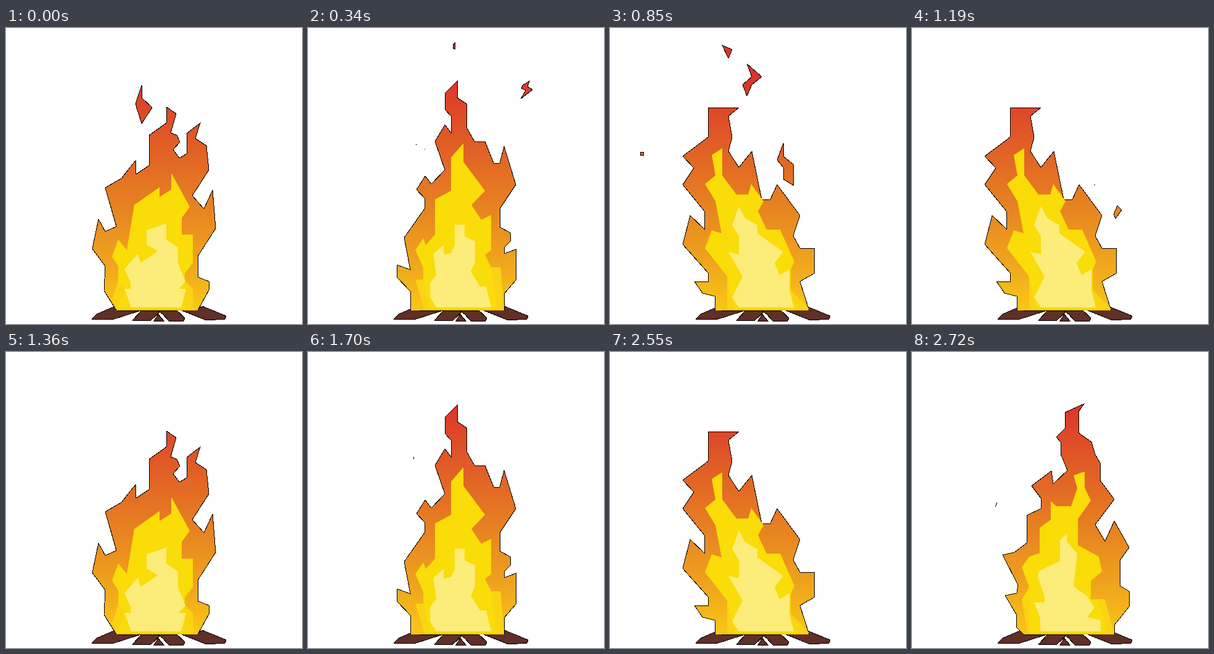
An HTML page that plays this animation: 480 by 480 pixels, repeating every 2.89 s.

```html
<!DOCTYPE html>
<html lang="en">
<head>
<meta charset="utf-8">
<title>Campfire</title>
<style>
  html, body { margin: 0; width: 100%; height: 100%; overflow: hidden; background: #fff; }
  svg { display: block; width: 100vw; height: 100vh; }
  .line { stroke: #000; vector-effect: non-scaling-stroke; shape-rendering: crispEdges; }
  .heat { fill: url(#heat); }
  .wood { fill: #5f2f28; }
  .middle { fill: #f9dc08; }
  .skirt { fill: #fad313; }
  .core { fill: #fcec79; }
</style>
</head>
<body>
<svg viewBox="0 0 480 480">
  <defs>
    <linearGradient id="heat" gradientUnits="userSpaceOnUse" x1="0" y1="85" x2="0" y2="458">
      <stop offset="0" stop-color="#dc352a"/>
      <stop offset=".23" stop-color="#df5727"/>
      <stop offset=".55" stop-color="#e78321"/>
      <stop offset=".8" stop-color="#f0a61d"/>
      <stop offset="1" stop-color="#f9c716"/>
    </linearGradient>

    <g id="upright">
      <path class="heat line" d="M179 458L159 426 161 386 140 358 150 310 161 330 179 322 161 259 187 244 210 215 211 237 232 223V174L260 154V128L276 139 267 170 277 174 282 185 271 197 281 211 293 204V171L315 154 307 179 325 191 329 230 302 272 321 293 335 263 340 325 311 370V404L329 411V425L311 458"/>
      <path class="middle" d="M180 456L172 440 182 411V386L172 371 182 343 196 360 208 287 249 258V274L268 262V235L298 290 285 308V335H303V381L290 398V410L303 424 304 456"/>
      <path class="skirt" d="M182 409L192 423 180 456 172 440ZM290 410L303 424 304 456H290"/>
      <path class="core" d="M203 453L192 423H202V413L192 391 214 366 218 381 246 362 228 351V328L260 317V343L279 356V382L291 411 280 423H292L284 453"/>
    </g>
    <g id="tall">
      <path class="heat line" d="M166 458V427L144 404V384L166 392 156 340 189 293V276L176 262 190 240 200 253 222 230 206 184 222 157 232 170V143L222 132V106L242 86V113L257 123V161L270 184H287L301 219H311L318 192 337 254 311 293V323L328 332V346L318 356V366L337 359V409L318 431V458"/>
      <path class="middle" d="M189 456L174 408H187V389L174 360 187 341 191 352 206 335V278L232 264V210L252 187V217L287 264 265 287 281 311 297 303V360L287 368 297 388H312L318 456"/>
      <path class="skirt" d="M174 408H187L198 456H189ZM297 388H312L318 456H306"/>
      <path class="core" d="M208 453L198 437V413L208 401 203 366 220 352V367L232 365 238 352V319H254V338L271 346V380L264 395 279 419H289L297 453"/>
    </g>
    <g id="swayRight">
      <path class="heat line" d="M181 458L169 446V425L151 395 170 391 172 378 147 329 166 325 186 310V265L209 254V237L194 217 226 193 229 214 252 192 241 165V146L234 138 248 124V98L279 84 270 97V131L291 146 297 166 305 180V208L328 239 297 280 313 307 328 274 352 317 337 338V379L352 388V413L328 443V458"/>
      <path class="middle" d="M188 456L178 402 190 381 178 349 190 332 207 326V285L225 272V242L234 250H258L268 221 262 200 280 194V220L290 241 269 271V313L303 332 308 356 290 371V401H313L327 456"/>
      <path class="skirt" d="M178 402H190V456H188ZM301 402H313L327 456H318"/>
      <path class="core" d="M208 453V432L198 406H215V397L204 364 206 355 240 339V305L251 295V307L268 327 262 380 284 396 296 415 284 430 306 435V453"/>
    </g>
    <g id="swayLeft">
      <path class="heat line" d="M170 458V435L150 430 137 411H159V397L118 351 130 304 153 326V297L118 254 136 227 118 208 159 177V129H209L192 143 198 177 192 200 209 226 230 200 246 278H260L271 254 308 304 297 337 308 357H331V398L308 411 323 458"/>
      <path class="middle" d="M190 456V403L154 357 165 328 181 333 171 281 154 253 171 239 165 206 182 195V239L205 270H224L229 253 249 281 240 297 254 327H276L299 379 293 392V425L323 456"/>
      <path class="skirt" d="M190 403L198 437 203 456H190ZM291 425H293L323 456H302"/>
      <path class="core" d="M209 453L198 437 215 403 192 363 209 367V337L198 320 209 289 219 308 239 320V333L281 363 267 381 275 401 291 391V425L298 453"/>
    </g>
    <use id="reach" href="#swayRight" transform="matrix(1.05 0 -.13 1.029 41.5 -13.3)"/>
    <use id="sink" href="#tall" transform="matrix(-1 0 0 .898 476 46.7)"/>
    <use id="wide" href="#upright" transform="matrix(-1.1 0 .28 1.039 393.8 -17.9)"/>

    <g id="notch">
      <path fill="#fff" d="M299 290L310 303 307 309H302L299 306Z"/>
      <path class="line" fill="none" d="M298 290V306L302 310 307 309"/>
    </g>
    <g class="heat">
      <path id="drop" class="heat line" d="M220 93L221 114 237 129 220 155 210 123Z"/>
      <path id="mote" class="heat line" d="M238 24V34L235 33V28Z"/>
      <path id="bolt" class="heat line" d="M348 93L359 86 356 95 364 100 345 115 353 101 346 98Z"/>
      <path id="shard" class="heat line" d="M182 28L198 35 192 49Z"/>
      <path id="arrow" class="heat line" d="M222 58L246 79 230 92 222 110 215 92 230 79Z"/>
      <path id="flake" class="heat line" d="M281 187V208L297 221V255L281 245V226L271 214Z"/>
      <path id="coal" class="heat line" d="M327 302L333 288 340 295 330 309Z"/>
      <circle id="ember" class="heat line" cx="52" cy="204" r="3"/>
    </g>
    <path id="dust" class="line" d="M175 188V190M189 196H190"/>
    <path id="fleck" class="line" d="M295 254H297"/>
    <path id="streak" class="line" d="M138 244L135 251"/>
    <path id="speck" class="line" d="M172 170L171 174"/>
  </defs>

  <g class="wood line">
    <path d="M139 472L147 464 175 452 181 458H219L172 473Z"/>
    <path d="M285 458L313 455 318 451 357 467 355 472 325 474Z"/>
    <path d="M205 474L220 458H252L234 475Z"/>
    <path d="M246 458H277L290 470 288 475H264L254 464Z"/>
    <path d="M247 464L256 475H240Z"/>
  </g>
  <g id="fire"></g>
</svg>
<script>
const STEP = 170;

// Parts shown in each step, as name or name:dx:dy.
const steps = [
  "upright drop",
  "reach shard:45:17",
  "tall mote bolt dust",
  "swayRight bolt:7:-14 ember:79:-8",
  "sink shard:2:29 arrow:0:20 ember:27:-3",
  "swayLeft shard arrow ember flake",
  "wide arrow:0:-40 flake:25:20",
  "swayLeft coal fleck",
  "upright",
  "reach",
  "tall speck",
  "swayRight streak",
  "sink",
  "swayLeft notch fleck",
  "wide",
  "swayLeft",
  "swayRight streak"
];

function place(part) {
  const [name, dx = 0, dy = 0] = part.split(":");
  return `<use href="#${name}" x="${dx}" y="${dy}"/>`;
}

const drawings = steps.map(parts => parts.split(" ").map(place).join(""));
const fire = document.getElementById("fire");
let shown = -1;

function tick() {
  const step = Math.floor(performance.now() / STEP) % drawings.length;
  if (step !== shown) fire.innerHTML = drawings[shown = step];
  requestAnimationFrame(tick);
}
tick();
</script>
</body>
</html>
```
